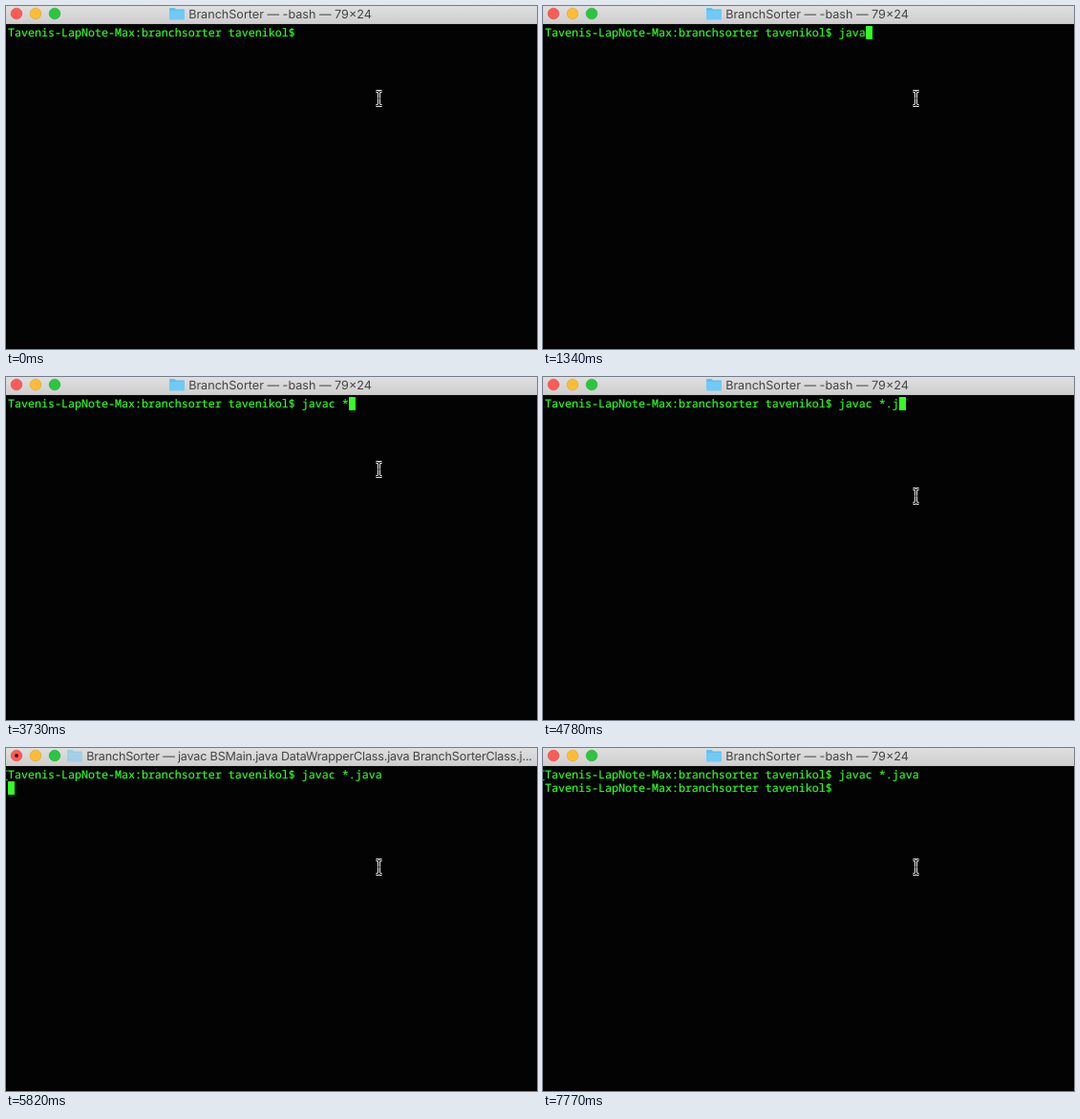
Animation, 556 px wide and 360 px high, one loop 8000 ms. Source, as an HTML page:

```html
<!DOCTYPE html>
<html lang="en">
<head>
<meta charset="utf-8">
<title>Terminal</title>
<style>
  html, body { margin: 0; width: 100%; height: 100%; overflow: hidden; background: #030303; }
  svg { display: block; }
  text { white-space: pre; text-rendering: geometricPrecision; }
  .term text {
    font: 500 11.667px "Noto Sans Mono", "DejaVu Sans Mono", monospace;
    fill: #2eff24; stroke: #2eff24; stroke-width: .2px;
  }
  .bar text { font: 12.6px Inter, Roboto, sans-serif; fill: #444; text-anchor: middle; }
  #busy text { letter-spacing: -0.18px; }
  #block { fill: #33ff26; }
  #pointer { fill: none; animation: drop 8s infinite step-end; }
  @keyframes drop {
    0% { transform: translateY(0); }
    48.5% { transform: translateY(17px); }
    50.375%, 100% { transform: translateY(28px); }
  }
</style>
</head>
<body>
<svg width="556" height="360" viewBox="0 0 556 360">
  <defs>
    <linearGradient id="metal" x2="0" y2="1">
      <stop stop-color="#dfdfdf"/>
      <stop offset="1" stop-color="#cecece"/>
    </linearGradient>
    <g id="folder">
      <path d="M0 4V3q0-1 1-1h4.500l1.500 1.500h8q1 0 1 1V7H0z" fill="#5fbfee"/>
      <path d="M0 5h16v8.500q0 1-1 1H1q-1 0-1-1z" fill="#6fcaf7"/>
    </g>
    <path id="beam" d="M387.500 89.500h1q2 0 2 2q0-2 2-2h1M390.500 91v12M387.500 104.500h1q2 0 2-2q0 2 2 2h1M389.500 97h2"/>
  </defs>

  <rect width="556" height="360" fill="#030303"/>
  <g class="bar">
    <rect width="556" height="19" fill="url(#metal)"/>
    <rect y="18" width="556" height="1" fill="#c2c2c2"/>
    <g stroke-width=".6">
      <circle cx="11" cy="8" r="5.800" fill="#fc5b56" stroke="#e0443e"/>
      <circle cx="31" cy="8" r="5.800" fill="#fdbc33" stroke="#dea123"/>
      <circle cx="51" cy="8" r="5.800" fill="#2ac63f" stroke="#1aab29"/>
    </g>
    <g id="idle">
      <use href="#folder" x="171"/>
      <text x="287" y="13">BranchSorter — -bash — 79×24</text>
    </g>
    <g id="busy">
      <circle cx="11" cy="8" r="2" fill="#6d0a08"/>
      <use href="#folder" x="64" opacity=".5"/>
      <text x="317.500" y="13">BranchSorter — javac BSMain.java DataWrapperClass.java BranchSorterClass.j...</text>
    </g>
  </g>

  <g class="term">
    <rect id="block" width="7" height="14"/>
    <text id="mark" x="-4" y="32">[</text>
    <text id="row1" x="2" y="32"></text>
    <text id="row2" x="2" y="46"></text>
  </g>
  <g id="pointer">
    <use href="#beam" stroke="#fff" stroke-width="3"/>
    <use href="#beam" stroke="#000" stroke-width="1.100"/>
  </g>
</svg>
<script>
  const LOOP = 8000;
  const PROMPT = "Tavenis-LapNote-Max:branchsorter tavenikol$ ";
  const COMMAND = "javac *.java";
  const KEYS = [740, 1040, 1190, 1340, 2540, 2990, 3730, 4480, 4780, 4930, 5070, 5220];
  const ENTER = 5820, DONE = 6720, TITLE_BACK = 6870;
  const BLINK_ON = 300, BLINK_OFF = 7770;

  const el = id => document.getElementById(id);
  const [idle, busy, mark, row1, row2, block] =
    ["idle", "busy", "mark", "row1", "row2", "block"].map(el);
  const show = (node, on) => node.setAttribute("visibility", on ? "visible" : "hidden");
  const write = (node, text) => { if (node.textContent !== text) node.textContent = text; };

  function draw(t) {
    const entered = t >= ENTER, done = t >= DONE;
    const running = entered && t < TITLE_BACK;
    const typed = KEYS.filter(k => k <= t).length;

    show(idle, !running);
    show(busy, running);
    show(mark, entered);
    write(row1, PROMPT + COMMAND.slice(0, typed));
    write(row2, done ? PROMPT : "");

    const column = entered ? (done ? PROMPT.length : 0) : PROMPT.length + typed;
    block.setAttribute("x", 2 + 7 * column);
    block.setAttribute("y", entered ? 35 : 21);
    show(block, t >= BLINK_ON && t < BLINK_OFF);
  }

  // Keep the pointer's keyframes on the same clock as the typing.
  const drop = el("pointer").getAnimations()[0];
  function tick() {
    const t = performance.now() % LOOP;
    if (drop) drop.currentTime = t;
    draw(t);
    requestAnimationFrame(tick);
  }
  tick();
</script>
</body>
</html>
```
